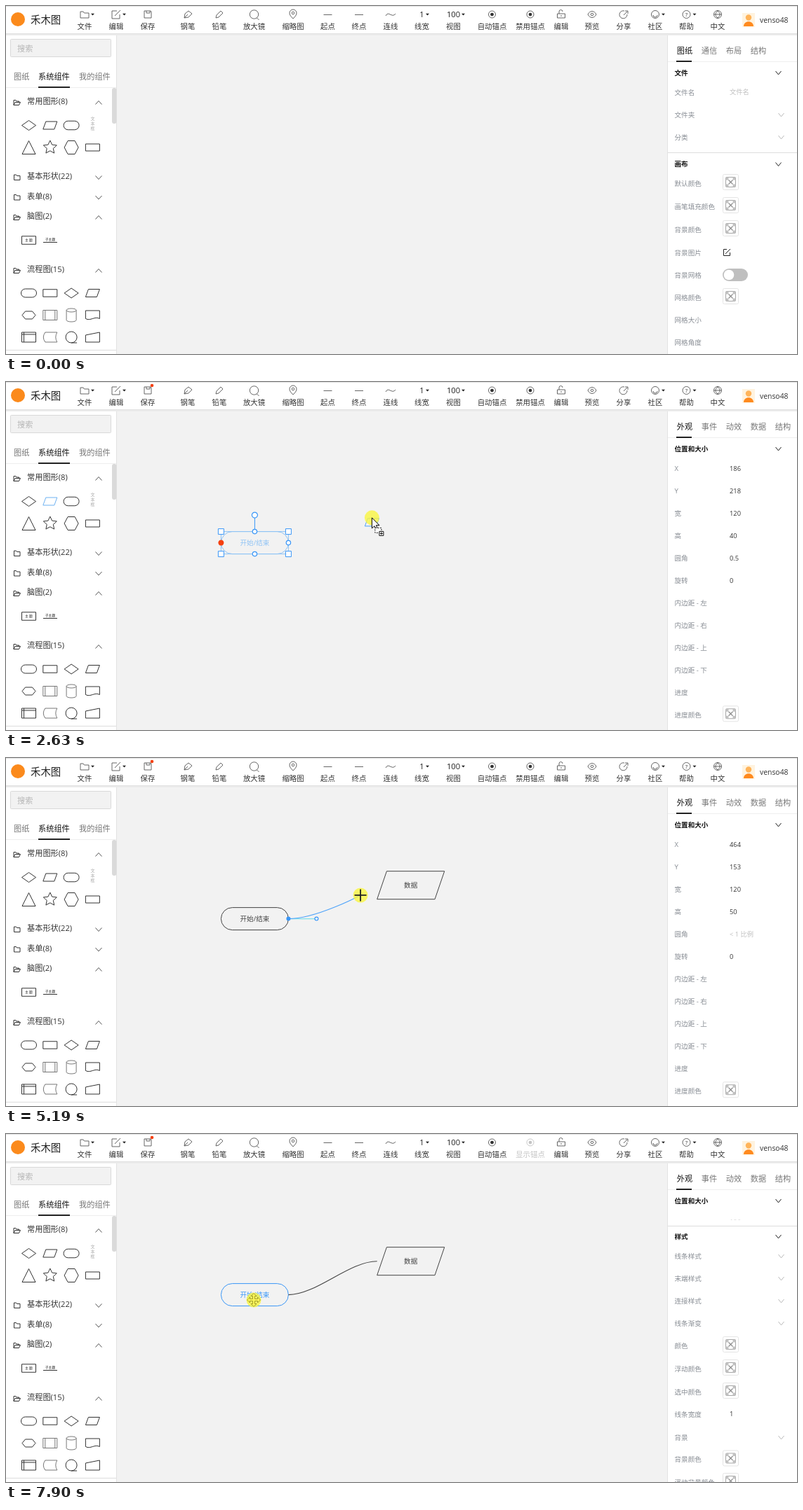
Write an HTML page with a canvas that moves like this. It is 1127 by 497 pixels and loops after 7.99 s.

```html
<!DOCTYPE html>
<html lang="zh-CN">
<head>
<meta charset="utf-8">
<title>流程图编辑器</title>
<style>
html, body { margin: 0; width: 100%; height: 100%; overflow: hidden; background: #fff; }
canvas { display: block; }
</style>
</head>
<body>
<canvas id="stage" width="1127" height="497"></canvas>
<script>
const g = document.getElementById('stage').getContext('2d');
const LOOP = 7990;
const FONT = '"Open Sans", "Noto Sans CJK SC", "Noto Sans CJK", sans-serif';
const INK = '#333', MUTED = '#888d94', PALE = '#8fc3f5', BLUE = '#3996f7', RED = '#f5400f';

// Moments of the story, in ms
const T = { show: 220, drag1: 1080, drop1: 1520, drag2: 2330, drop2: 2800, draw: 4410,
  snap: 5490, release: 5800, disable: 6750, press: 7760, open: 7840 };

const pointerKeys = [
  [220, 836, 469], [1000, 86, 167], [1080, 86, 167], [1380, 289, 229], [1500, 347, 226],
  [1600, 347, 227], [1850, 92, 163], [1930, 90, 163], [2090, 63, 164], [2330, 63, 164],
  [2630, 521, 194], [2780, 577, 175], [2950, 577, 177], [3400, 530, 120], [3950, 402, 229],
  [4030, 401, 234], [4410, 402, 232], [4580, 440, 218], [5190, 505, 196], [5570, 529, 182],
  [5800, 530, 184], [5880, 531, 190], [6580, 746, 25], [6900, 746, 25], [7670, 353, 237]
];

function pointerAt(t) {
  const i = pointerKeys.findIndex(k => k[0] > t);
  if (i < 0) return pointerKeys.at(-1).slice(1);
  if (i === 0) return pointerKeys[0].slice(1);
  const [t0, x0, y0] = pointerKeys[i - 1], [t1, x1, y1] = pointerKeys[i];
  const k = (t - t0) / (t1 - t0);
  return [x0 + (x1 - x0) * k, y0 + (y1 - y0) * k];
}

// Drawing helpers
function text(s, x, y, size = 9.6, color = MUTED, align = 'left', weight = 400) {
  g.font = `${weight} ${size}px ${FONT}`;
  g.fillStyle = color;
  g.textAlign = align;
  g.fillText(s, x, y + size * 0.37);
}
function rect(x, y, w, h, color) {
  g.fillStyle = color;
  g.fillRect(x, y, w, h);
}
function path(d, x, y, stroke, fill, width = 1) {
  const p = new Path2D(d);
  g.save();
  g.translate(x, y);
  g.lineWidth = width;
  if (fill) { g.fillStyle = fill; g.fill(p); }
  if (stroke) { g.strokeStyle = stroke; g.stroke(p); }
  g.restore();
}
function box(x, y, w, h, r, stroke, fill, width = 1) {
  g.beginPath();
  g.roundRect(x, y, w, h, r);
  g.lineWidth = width;
  if (fill) { g.fillStyle = fill; g.fill(); }
  if (stroke) { g.strokeStyle = stroke; g.stroke(); }
}
const ring = (r, x = 0, y = 0) =>
  `M${x + r} ${y}A${r} ${r} 0 1 1 ${x - r} ${y}A${r} ${r} 0 1 1 ${x + r} ${y}z`;
const dot = (x, y, r, stroke, fill) => path(ring(r), x, y, stroke, fill, 1.2);
const chevron = (x, y, up, color = INK, w = 4.5) =>
  path(up ? `M${-w} 2.5L0-2.5L${w} 2.5` : `M${-w}-2.5L0 2.5L${w}-2.5`, x, y, color);

const EDIT = 'M1-5H-6V6H5V0M-2 2L6-6';
const ANCHOR = ring(5) + ring(1.5) + ring(0.8);
const tools = [
  ['文件', 112, 'M-6-4h4l1.5 2H6V5H-6z', 1], ['编辑', 157, EDIT, 1],
  ['保存', 202, 'M-5-5H4L5-4V5H-5zM-2-5V-2H3V-5'],
  ['钢笔', 259, 'M-5 5L-4-1L1-5L6-1L1 4zM-5 5L0 0'], ['铅笔', 304, 'M-5 5L-4 1L2-5L5-2L-1 4z'],
  ['放大镜', 353.5, ring(6.2) + 'M4 5L7 8'],
  ['缩略图', 409, 'M0 6C-3 3-5 1-5-2A5 5 0 0 1 5-2C5 1 3 3 0 6z' + ring(1.8, 0, -2)],
  ['起点', 458.5, 'M-6 .5H6'], ['终点', 503, 'M-6 .5H6'], ['连线', 548, 'M-7 2C-3-6 2 6 7-1'],
  ['线宽', 592.5, '1', 1], ['视图', 637.5, '100', 1],
  ['自动锚点', 692.5, ANCHOR], ['禁用锚点', 747, ANCHOR],
  ['编辑', 791, 'M-5.5-1H5.5V5H-5.5zM-3-1V-4A2.5 2.5 0 0 1 2-4M-1 2H1'],
  ['预览', 835, 'M-6 0C-3-6 3-6 6 0C3 6-3 6-6 0z' + ring(1.8)],
  ['分享', 880, 'M1-5A5.5 5.5 0 1 0 5 0M0 1L5-4M2-5H6V-1'],
  ['社区', 925, ring(5.5) + 'M-3 1A3 3 0 0 0 3 1', 1], ['帮助', 969.5, ring(5.5), 1],
  ['中文', 1014, ring(5.5) + 'M-5 0H5M0-5C-4-2-4 2 0 5C4 2 4-2 0-5']
];

function toolbar(t) {
  rect(0, 0, 1127, 40, '#fff');
  rect(0, 0, 1127, 1, '#e3e3e3');
  rect(0, 39, 1127, 1, '#e0e0e0');
  rect(0, 40, 1127, 2, '#ebebeb');
  dot(17, 19, 10, null, '#fb8a1c');
  text('禾木图', 35, 20, 14.4, '#222');
  for (const [label, x, icon, caret] of tools) {
    const off = label === '禁用锚点' && t >= T.disable;
    const color = off ? '#c4c4c4' : INK;
    text(off ? '显示锚点' : label, x, 29, 10.4, color, 'center');
    if (/^\d/.test(icon)) text(icon, x, 12, 11.2, '#222', 'center');
    else path(icon, x, 12, off ? '#c4c4c4' : '#555', null, 0.9);
    if (icon === ANCHOR) dot(x, 12, 1.7, color, color);
    if (label === '帮助') text('?', x, 12, 8, INK, 'center');
    if (caret) path('M-2.5-1.3H2.5L0 1.5z', x + (icon === '1' ? 8 : icon === '100' ? 14 : 11.5), 12, null, '#222');
  }
  if (t >= T.drop1) dot(208, 5, 2.3, null, RED);
  rect(1049, 10, 18, 20, '#fff3df');
  dot(1058, 16.5, 4.2, null, '#ffb45a');
  path('M-7 5C-7-4 7-4 7 5z', 1058, 24, null, '#ff8a1e');
  text('venso48', 1074, 20, 10.4, '#333');
}

const pill = (w, h) => `M${h / 2 - w / 2} ${-h / 2}H${w / 2 - h / 2}a${h / 2} ${h / 2} 0 0 1 0 ${h}H${h / 2 - w / 2}a${h / 2} ${h / 2} 0 0 1 0 ${-h}z`;
const block = (w, h) => `M${-w / 2} ${-h / 2}h${w}v${h}h${-w}z`;
const DIAMOND = 'M-10 0L0-7L10 0L0 7z', SLANT = 'M-6-5.5H10L6 5.5H-10z', PILL = pill(22, 12.5);
const star = 'M' + Array.from({ length: 10 }, (_, i) => {
  const a = i * Math.PI / 5 - Math.PI / 2, r = i % 2 ? 4.8 : 10;
  return `${(r * Math.cos(a)).toFixed(2)} ${(r * Math.sin(a)).toFixed(2)}`;
}).join('L') + 'z';
const palette = [
  [170.5, DIAMOND, SLANT, PILL, ''],
  [202, 'M0-9.5L9.5 9.5H-9.5z', star, 'M-10 0L-5-9.5H5L10 0L5 9.5H-5z', block(20, 10)],
  [410, pill(22, 12), block(20, 10.5), DIAMOND, SLANT],
  [441.5, 'M-9.5 0L-5-5.5H5L9.5 0L5 5.5H-5z', block(20, 14) + 'M-7-7V7M7-7V7',
    'M-7-7V7A7 2.5 0 0 0 7 7V-7A7 2.5 0 0 0-7-7A7 2.5 0 0 0 7-7', 'M-10-6.5H10V5C3 1-3 9-10 5z'],
  [473, block(20, 14) + 'M-7-7V7M-10-4H10', 'M-7-7H10Q6 0 10 7H-7Q-12 0-7-7z',
    ring(8) + 'M0 8H8', 'M-10-3L10-7V7H-10z']
];
const groups = [['常用图形(8)', 136, 1], ['基本形状(22)', 243], ['表单(8)', 271.5],
  ['脑图(2)', 300, 1], ['流程图(15)', 376, 1]];

function sidebar(hot) {
  rect(0, 42, 157, 455, '#fff');
  rect(157, 42, 1, 455, '#e2e2e2');
  box(6.5, 47.5, 143, 25, 1, '#d9d9d9', '#f2f2f2');
  text('搜索', 16, 61, 11.2, '#b5b5b5');
  text('图纸', 11, 101, 11.2, '#777');
  text('系统组件', 46, 101, 11.2, '#111');
  text('我的组件', 104, 101, 11.2, '#777');
  rect(0, 116, 157, 1, '#eee');
  rect(46, 115, 45, 2, '#222');
  box(151, 117, 6.5, 51, 3, null, '#dadada');
  for (const [label, y, open] of groups) {
    path(open ? 'M-4.5 4V-3h3l1 1.5H3V0M-4.5 4L-2.5 0H5L3 4z' : 'M-4-3.5h3l1 1.5H4.5V4H-4z', 15.5, y + 1.5, INK);
    text(label, 30, y, 11.2, '#333');
    chevron(132, y + 2, open, '#555');
  }
  palette.forEach(([y, ...shapes], row) => shapes.forEach((d, col) => {
    const soft = row > 2 && (col === 1 || row === 3 && col === 2);
    path(d, 32.5 + col * 30.3, y, row === 0 && col === hot ? '#6db1f2' : soft ? '#777' : INK);
  }));
  [...'文本框'].forEach((c, i) => text(c, 123.5, 161 + i * 7, 6, '#aaa', 'center'));
  path(block(20, 11.5), 32.5, 334.5, INK);
  text('主 题', 32.5, 334.5, 4.8, '#222', 'center');
  text('子主题', 63, 333.5, 4.8, '#222', 'center');
  rect(53, 337, 20, 1, INK);
  rect(0, 491, 157, 1, '#ddd');
}

// Property panel: rows are [label, y, kind or value]
const CH = 'chevron', SW = 'swatch';
const sheetRows = [['文件名', 123, '~文件名'], ['文件夹', 155, CH], ['分类', 187, CH],
  ['默认颜色', 253, SW], ['画笔填充颜色', 286, SW], ['背景颜色', 319, SW], ['背景图片', 352, 'edit'],
  ['背景网格', 384, 'toggle'], ['网格颜色', 416, SW], ['网格大小', 448], ['网格角度', 480]];
const shapeRows = values => ['X', 'Y', '宽', '高', '圆角', '旋转', '内边距 - 左', '内边距 - 右',
  '内边距 - 上', '内边距 - 下', '进度', '进度颜色'].map((label, i) =>
  [label, 123.8 + i * 31.95, i === 11 ? SW : values[i]]);
const styleTail = y => [['线条渐变', y, CH], ['颜色', y + 32, SW], ['浮动颜色', y + 65, SW],
  ['选中颜色', y + 98, SW], ['线条宽度', y + 130, '1'], ['背景', y + 163, CH],
  ['背景颜色', y + 194.5, SW], ['浮动背景颜色', y + 227, SW]];
const lineRows = [['线条样式', 123, CH], ['连线类型', 155, 'arc'], ['末端样式', 187, CH],
  ['连接样式', 219, CH], ...styleTail(251)];

function swatch(x, y) {
  box(x - 11, y - 11, 22, 22, 2, '#e4e4e4', '#fff');
  box(x - 7, y - 7, 14, 14, 1.5, '#a6a6a6', '#fff');
  for (const sx of [-1, 1]) for (const sy of [-1, 1]) {
    rect(x + sx * 5 - 2, y + sy * 5 - 2, 4, 4, '#c2c2c2');
  }
  path('M-3-3L3 3M3-3L-3 3', x, y, '#8c8c8c', null, 1.2);
}
function row([label, y, kind]) {
  text(label, 952.5, y);
  if (kind === undefined) return;
  if (kind === CH || kind === 'arc') chevron(1104.5, y + 0.5, false, '#bbb', 4);
  if (kind === 'arc') path('M-32 0Q0-8 32 0', 1063, y - 0.5, '#222', null, 1.2);
  else if (kind === SW) swatch(1032.5, y - 1.5);
  else if (kind === 'edit') path('M0-4.5H-4.5V4.5H4.5V0M-2 2L5-5', 1027, y, '#222');
  else if (kind === 'toggle') {
    box(1021, y - 9, 36, 18, 9, null, '#bfbfbf');
    dot(1030, y, 7.3, null, '#fff');
  } else if (kind !== CH) {
    const hint = kind[0] === '~';
    text(hint ? kind.slice(1) : kind, 1031, y, 9.3, hint ? '#bfbfbf' : '#333');
  }
}
function header(label, y) {
  text(label, 952.5, y, 9.6, '#111', 'left', 700);
  chevron(1100.5, y + 0.5, false, '#222', 4);
}
function panel(t) {
  rect(942, 42, 185, 455, '#fff');
  rect(942, 42, 1, 455, '#e2e2e2');
  const tabs = t < T.drop1 ? ['图纸', '通信', '布局', '结构'] : ['外观', '事件', '动效', '数据', '结构'];
  tabs.forEach((s, i) => text(s, 967 + i * 35, 64, 11.2, i ? '#777' : '#111', 'center'));
  rect(943, 79, 184, 1, '#eee');
  rect(955, 78, 22, 2, '#222');
  if (t < T.drop1) {
    header('文件', 95);
    rect(943, 209, 184, 1, '#ddd');
    header('画布', 225.5);
    sheetRows.forEach(row);
  } else if (t < T.release) {
    header('位置和大小', 95);
    shapeRows(t < T.drop2 ? ['186', '218', '120', '40', '0.5', '0']
      : ['464', '153', '120', '50', '~< 1 比例', '0']).forEach(row);
  } else if (t < T.open) {
    header('样式', 95);
    lineRows.forEach(row);
  } else {
    const shift = -16 * Math.max(0, 1 - (t - T.open) / 60);
    header('位置和大小', 95);
    g.save();
    g.beginPath();
    g.rect(943, 108, 184, 14.5);
    g.clip();
    g.globalAlpha = 0.4;
    row(['X', 126, '186']);
    g.restore();
    g.save();
    g.translate(0, shift);
    rect(943, 131, 184, 1, '#ddd');
    header('样式', 146);
    [['线条样式', 174, CH], ['末端样式', 206, CH], ['连接样式', 238, CH], ...styleTail(270)].forEach(row);
    g.restore();
  }
}

// Canvas shapes
const start = { x: 306.4, y: 213.6, w: 96, h: 32, label: '开始/结束', d: pill(96, 32) };
const data = { x: 528.7, y: 161.7, w: 96, h: 40, label: '数据', d: 'M-34.3-20H48L34.3 20H-48z' };
const OUT = [402.4, 229.6], IN = [528.7, 181.7], REACH = 40;
const within = (s, x, y, m = 3) => x > s.x - m && x < s.x + s.w + m && y > s.y - m && y < s.y + s.h + m;

function shape(s, color, { anchors, selected, hotSide }) {
  const cx = s.x + s.w / 2, cy = s.y + s.h / 2, right = s.x + s.w, bottom = s.y + s.h;
  path(s.d, cx, cy, color, null, 1);
  text(s.label, cx, cy, 9.6, color, 'center');
  if (selected) {
    box(s.x, s.y, s.w, s.h, 0, PALE);
    path('M0 0V20', cx, s.y - 20, BLUE);
    dot(cx, s.y - 23.5, 4, BLUE, '#fff');
    for (const x of [s.x, right]) for (const y of [s.y, bottom]) box(x - 4, y - 4, 8, 8, 0, BLUE, '#fff');
  }
  if (anchors) [[s.x, cy], [cx, s.y], [right, cy], [cx, bottom]].forEach(([x, y], i) =>
    i === hotSide ? dot(x, y, 3.4, RED, RED) : dot(x, y, 3.2, BLUE, '#fff'));
}

function connector(t, x, y) {
  const snapped = t >= T.snap, selected = t < T.press;
  const end = snapped ? IN : [x, y];
  const outHandle = [OUT[0] + REACH, OUT[1]];
  const inHandle = snapped ? [IN[0] - REACH, IN[1]] : end;
  const [from, handle] = snapped ? [IN, inHandle] : [OUT, outHandle];
  if (selected) path(`M${from}L${handle}`, 0, 0, '#7fe0ea', null, 1.2);
  path(`M${OUT}C${outHandle} ${inHandle} ${end}`, 0, 0, selected ? '#4ea3fa' : '#444', null, 1.1);
  if (!selected) return;
  dot(...handle, 2.4, BLUE, '#fff');
  dot(...OUT, 2.4, BLUE, t < T.release ? BLUE : '#fff');
  if (snapped) dot(...IN, 2.5, BLUE, BLUE);
}

function cursor(kind, x, y, pressed) {
  if (pressed) dot(x, y, 10.5, null, 'rgba(250,246,60,.78)');
  if (kind === 'arrow') path('M0 0V15L3.6 11.8L6.2 17.5L8.6 16.4L6 10.8H10.6z', x, y, '#000', '#fff');
  if (kind === 'cross') path('M-8.5 0H8.5M0-8.5V8.5', x, y, '#222', null, 1.8);
  if (kind === 'hand') {
    path('M-1 9V1Q0-1 1.5 1V7Q3 5.5 4.2 7.2Q5.6 6 6.6 7.8Q8.6 7 8.8 9.2V13Q8 15 7 17.5H0Q-2 14-5 11Q-4.5 8.5-1 11z', x, y, '#111', '#fff');
  }
  if (kind === 'move') {
    const arm = 'M0-9.5L4-5.5H1.5V-1.5H5.5V-4L9.5 0L5.5 4V1.5H1.5V5.5H4L0 9.5L-4 5.5H-1.5V1.5H-5.5V4L-9.5 0L-5.5-4V-1.5H-1.5V-5.5H-4z';
    path(arm, x, y, pressed ? '#8f8a1c' : '#333', pressed ? '#fbf65a' : '#fff', 0.8);
  }
}

function render(t) {
  const [x, y] = pointerAt(t);
  const between = (a, b) => t >= a && t < b;
  const drag1 = between(T.drag1, T.drop1), drag2 = between(T.drag2, T.drop2);
  const dragging = drag1 || drag2, drawing = between(T.draw, T.release);
  const anchored = t < T.disable;

  rect(0, 0, 1127, 497, '#f2f2f2');
  const over1 = t >= T.drop1 && !dragging && !drawing && within(start, x, y);
  const over2 = t >= T.drop2 && within(data, x, y, drawing ? 20 : 4);
  const nearOut = Math.hypot(x - OUT[0], y - OUT[1]) < 9;
  const nearIn = Math.hypot(x - IN[0], y - IN[1]) < 10;

  if (t >= T.drop1) {
    const selected = t < T.drop2;
    const color = t >= T.press ? BLUE : selected || over1 ? PALE : '#444';
    shape(start, color, { selected, anchors: anchored && (selected || over1),
      hotSide: selected ? (t > 1650 ? 0 : -1) : nearOut ? 2 : -1 });
  }
  if (t >= T.drop2) {
    const selected = t < T.draw;
    shape(data, over2 ? PALE : selected ? BLUE : '#444', { selected, anchors: anchored && (selected || over2) });
  }
  if (t >= T.draw) connector(t, x, y);
  if (t >= T.draw && over2 && nearIn) dot(...IN, 3.1, RED, RED);

  const overPalette = t >= T.show && !dragging && y > 155 && y < 185;
  const hot = drag1 || overPalette && x > 78 && x < 106 ? 2 : drag2 || overPalette && x > 50 && x <= 78 ? 1 : -1;
  sidebar(hot);
  panel(t);
  toolbar(t);

  if (t < T.show) return;
  if (drag1) path(PILL, x + 7, y + 3, '#4ba0f5');
  if (drag2) path(SLANT, x, y + 6.5, '#4ba0f5');
  const kind = drawing || over1 && nearOut && t > T.drop2 && t < T.draw ? 'cross'
    : y < 40 ? 'hand' : over1 || over2 ? 'move' : 'arrow';
  cursor(kind, x, y, dragging || drawing || t >= T.press);
  if (dragging) {
    g.setLineDash([2, 1.5]);
    box(x + 4.5, y + 14.5, 9, 7, 0, '#111', '#fff');
    g.setLineDash([]);
    box(x + 10.5, y + 19.5, 6, 6, 0, '#111', '#fff');
    path('M-2 0H2M0-2V2', x + 13.5, y + 22.5, '#111');
  }
}

const begin = performance.now();
function tick() {
  render((performance.now() - begin) % LOOP);
  requestAnimationFrame(tick);
}
tick();
</script>
</body>
</html>
```
